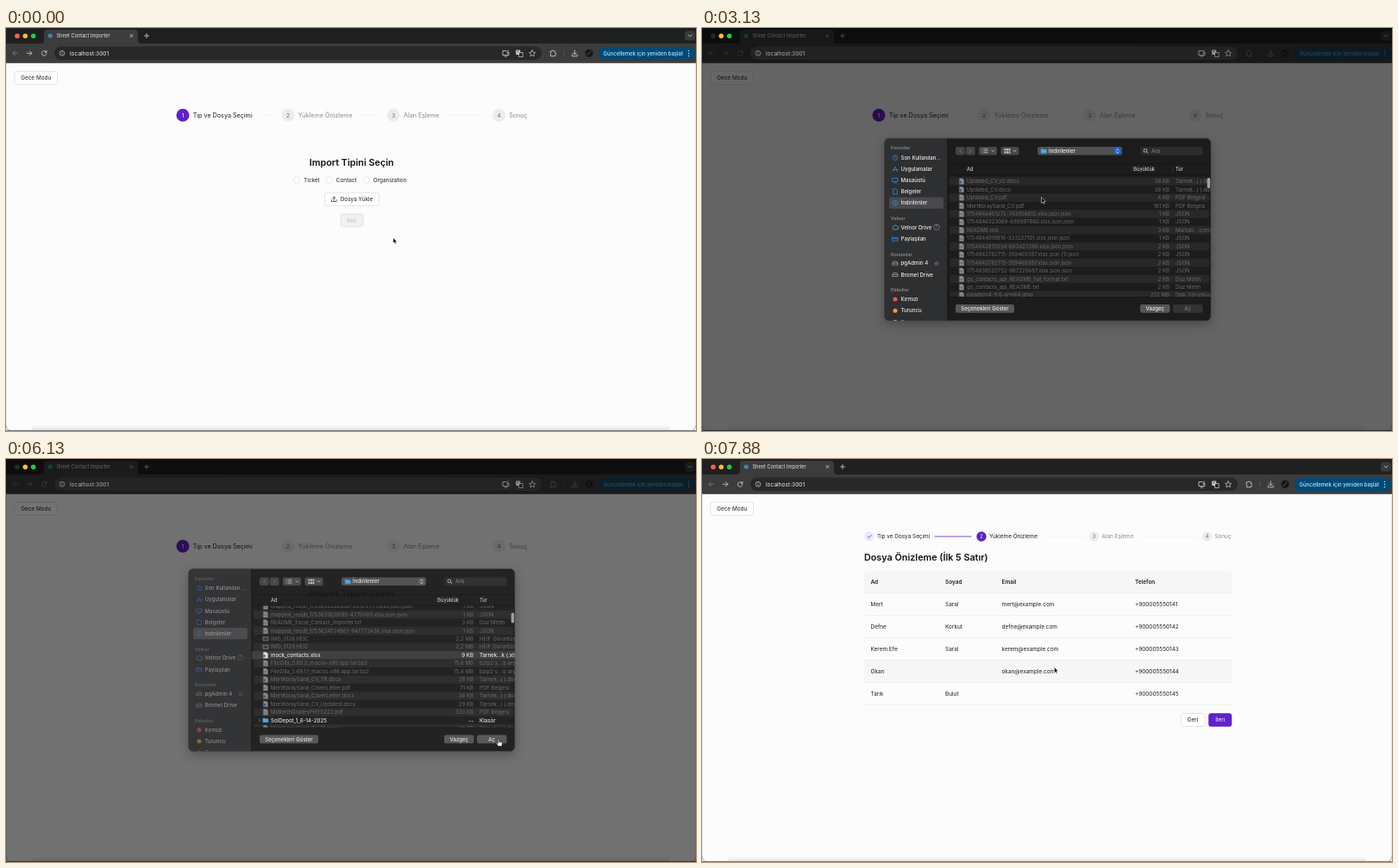
Recreate the animation shown at these times as an HTML page. Size 800 by 468 pixels, loop 8 s.

```html
<!DOCTYPE html>
<html lang="tr">
<head>
<meta charset="utf-8">
<title>Sheet Contact Importer</title>
<style>
html, body { margin: 0; width: 100%; height: 100%; overflow: hidden; background: #000; }
svg { display: block; width: 800px; height: 468px; font-family: Inter, Roboto, sans-serif; }
text { white-space: pre; }
</style>
</head>
<body>
<svg id="stage" viewBox="0 0 800 468"></svg>
<script>
const PURPLE = '#6022c6', HOVER = '#8549de', INK = '#202020', BLUE = '#2b8cf0';

// Drawing helpers; text is centred vertically on y.
const text = (x, y, s, size, fill, more = '') =>
  `<text x="${x}" y="${y + size * .36}" font-size="${size}" fill="${fill}" ${more}>${s}</text>`;
const rect = (x, y, w, h, r, fill, more = '') =>
  `<rect x="${x}" y="${y}" width="${w}" height="${h}" rx="${r}" fill="${fill}" ${more}/>`;
const circle = (x, y, r, fill, more = '') =>
  `<circle cx="${x}" cy="${y}" r="${r}" fill="${fill}" ${more}/>`;
const path = (d, stroke, w = .8, fill = 'none') =>
  `<path d="${d}" stroke="${stroke}" stroke-width="${w}" fill="${fill}" stroke-linecap="round" stroke-linejoin="round"/>`;
const group = (id, body) => `<g id="${id}">${body}</g>`;
const MID = ' text-anchor="middle"', END = ' text-anchor="end"', BOLD = ' font-weight="600"', MEDIUM = ' font-weight="500"';

const button = (x, y, w, h, label, fill, stroke, color) =>
  rect(x, y, w, h, 2.6, fill, `stroke="${stroke}" stroke-width=".6"`) +
  text(x + w / 2, y + h / 2, label, 6.45, color, MID);

// Browser window
const LIGHT = '#d5d5d5';
function browser() {
  return rect(0, 0, 800, 20, 0, '#1f2020') +
    rect(0, 18, 800, 22.5, 0, '#3c3c3c') +
    path('M40 18.5Q44 18 44 14V6Q44 2 48 2H149Q153 2 153 6V14Q153 18 157 18.5Z', 'none', 0, '#3c3c3c') +
    circle(51.3, 9, 2.6, '#3c88b0') +
    text(58.5, 9, 'Sheet Contact Importer', 5.65, '#e6e6e6') +
    path('M144 7.5l3 3m0-3l-3 3', LIGHT) +
    path('M160.5 9h5M163 6.5v5', LIGHT) +
    rect(787, 3.5, 12, 11, 3.5, '#393a3a') + path('M791 8l2 2 2-2', LIGHT) +
    path('M13.5 29.3H8m2.5-2.5L8 29.3l2.5 2.5', '#808080') +
    group('nav',
      path('M24.3 29.3H30m-2.5-2.5L30 29.3l-2.5 2.5', LIGHT) +
      path('M46.7 28A2.8 2.8 0 1 0 47 30M47 26.3V28.3H45', LIGHT)) +
    group('tools',
      path('M631.5 27H633a1 1 0 0 1 2 0h1.7v2a1 1 0 0 1 0 2v1.7h-5.2v-2a1 1 0 0 0 0-1.7Z', LIGHT) +
      path('M647 26.5v5', '#606060', .6) +
      path('M659.3 25.8v5m-2-2l2 2 2-2M656.3 30.8v2h6v-2', LIGHT) +
      circle(676, 29.3, 4.6, '#151515') + path('M673.5 31q3-1 4.5-4', '#5a564e', 1) +
      rect(687, 22, 112, 15, 7, '#004a77') +
      text(692.5, 29.5, 'Güncellemek için yeniden başlat', 6, '#c2e7ff', MEDIUM) +
      [26.5, 29.5, 32.5].map(y => circle(791.5, y, .75, '#c2e7ff')).join(''));
}

const omnibox = () => rect(56, 21.5, 565, 15.5, 7.7, '#282828') +
  circle(65, 29.3, 2.9, 'none', `stroke="${LIGHT}" stroke-width=".7"`) +
  path('M65 29v1.7M65 27.7v.1', LIGHT, .7) +
  text(74, 29.5, 'localhost:3001', 6.6, '#ececec') +
  path('M580 26.5H576v5h7v-1.5M578 33h3M582 26v3.5m-1.5-1.3l1.5 1.5 1.5-1.5', LIGHT) +
  rect(591.2, 25.5, 5, 5.5, .8, LIGHT) + path('M595 28.5h4.2v5H595Z', LIGHT, .7, '#282828') +
  path('M592.5 27h2.4M593.7 26.5q0 2-1.2 3', '#333', .5) +
  path('M610.2 25.8l1.1 2.3 2.5.3-1.8 1.8.5 2.5-2.3-1.2-2.3 1.2.5-2.5-1.8-1.8 2.5-.3Z', LIGHT, .7);

// Progress steps
const STEPS = ['Tip ve Dosya Seçimi', 'Yükleme Önizleme', 'Alan Eşleme', 'Sonuç'];
function steps(xs, y, r, size, active, lines) {
  const dot = (x, i) => {
    const on = i === active, done = i < active;
    return circle(x, y, r, on ? PURPLE : done ? '#f0e7fb' : '#ececec') +
      (done ? path(`M${x - 2} ${y}l1.5 1.5 2.7-3`, PURPLE)
            : text(x, y, i + 1, size * .9, on ? '#fff' : '#666', MID)) +
      text(x + r * 1.56, y, STEPS[i], size, i <= active ? INK : '#8a8a8a');
  };
  return xs.map(dot).join('') + lines.map(([a, b], i) =>
    path(`M${a} ${y}H${b}`, i < active ? PURPLE : '#ececec', i < active ? .8 : .6)).join('');
}

// First page
const radio = (x, label) => circle(x, 176.5, 3.7, '#fff', 'stroke="#d9d9d9" stroke-width=".6"') +
  text(x + 7.8, 176.7, label, 6.45, INK);
const upload = (color, line) => rect(369.5, 191.3, 63, 15, 2.6, '#fff', `stroke="${line}" stroke-width=".6"`) +
  path('M380.3 200.3v-4m-1.7 1.5l1.7-1.7 1.7 1.7M377.5 199.5v2h5.6v-2', color, .7) +
  text(387.7, 199, 'Dosya Yükle', 6.45, color);

const firstPage = () =>
  steps([205, 327, 449.3, 571.5], 101.3, 7.5, 7.2, 0, [[293, 312], [411, 433], [511, 556]]) +
  text(400.7, 155.8, 'Import Tipini Seçin', 10.8, '#111', MID + BOLD) +
  radio(337.2, 'Ticket') + radio(375, 'Contact') + radio(418, 'Organization') +
  group('picked', circle(337.2, 176.5, 4, PURPLE) + circle(337.2, 176.5, 1.6, '#fff')) +
  upload(INK, '#d0d0d0') + group('hover', upload(HOVER, HOVER)) +
  group('waiting', button(388, 216, 26, 14.7, 'İleri', '#f1f1f1', '#d6d6d6', '#bdbdbd')) +
  group('ready',
    path('M373 218.5l2.6-2.7a1.2 1.2 0 0 0-1.7-1.7l-2.9 3a2 2 0 0 0 2.9 2.8l2.4-2.5', '#888', .6) +
    text(379, 217, 'mock_contacts.xlsx', 6.45, INK) +
    button(388, 230, 26, 14.7, 'İleri', PURPLE, PURPLE, '#fff'));

// Second page
const PEOPLE = [
  ['Ad', 'Soyad', 'Email', 'Telefon'],
  ['Mert', 'Saral', 'mert@example.com', '+900005550141'],
  ['Defne', 'Korkut', 'defne@example.com', '+900005550142'],
  ['Kerem Efe', 'Saral', 'kerem@example.com', '+900005550143'],
  ['Okan', '', 'okan@example.com', '+900005550144'],
  ['Tarık', 'Bulut', '', '+900005550145']];
const secondPage = () =>
  steps([194, 324, 454.6, 585.5], 90, 5.7, 6.4, 1, [[270, 312], [396, 444], [507, 574]]) +
  text(188, 114, 'Dosya Önizleme (İlk 5 Satır)', 10.8, '#111', BOLD) +
  rect(188, 130, 426, 25.5, 3, '#f6f6f6') +
  group('rowHover', rect(188, 233.5, 426, 26, 0, '#f6f6f6')) +
  [274, 339, 494].map(x => path(`M${x} 138v10`, '#ebebeb', .5)).join('') +
  PEOPLE.map((row, i) => path(`M188 ${155.5 + i * 26}h426`, '#ebebeb', .6) +
    row.map((s, j) => text([195.5, 282, 347.5, 502][j], 142.7 + i * 26, s, 6.45, INK, i ? '' : BOLD)).join('')).join('') +
  button(555.3, 295.5, 27.5, 15, 'Geri', '#fff', '#d0d0d0', INK) +
  button(587.5, 295.5, 26.5, 15, 'İleri', PURPLE, PURPLE, '#fff');

// File dialog
const ROW = 9.45, FILLERS = 20, SCROLL = ROW * (FILLERS + 16) - 3;
const random = seed => { const v = Math.sin(seed * 12.9898) * 43758.5453; return v - Math.floor(v); };
const filler = Array.from({length: FILLERS}, (_, i) =>
  `mapped_result_${1753838520752 - i * 10894021}-${Math.floor(random(i + 1) * 9e8 + 1e8)}.xlsx.json.json|1 KB|JSON`);
const DOC = 'Tarnek…j (.docx)';
const FILES = [
  'Updated_CV_v2.docx|38 KB|' + DOC, 'Updated_CV.docx|38 KB|' + DOC,
  'Updated_CV.pdf|4 KB|PDF Belgesi', 'MertKoraySaral_CV.pdf|181 KB|PDF Belgesi',
  '1754846451272-743956612.xlsx.json.json|1 KB|JSON', '1754846323069-689997660.xlsx.json.json|1 KB|JSON',
  'README.md|3 KB|Markdo…içeriği', '1754844919816-333227101.xlsx.json.json|1 KB|JSON',
  '1754842815034-693427266.xlsx.json.json|2 KB|JSON', '1754842782715-359469387.xlsx.json (1).json|2 KB|JSON',
  '1754842782715-359469387.xlsx.json.json|2 KB|JSON', '1754838520752-987225687.xlsx.json.json|2 KB|JSON',
  'go_contacts_api_README_full_format.txt|2 KB|Düz Metin', 'go_contacts_api_README.txt|2 KB|Düz Metin',
  'pgadmin4-9.6-arm64.dmg|222 MB|Disk Görüntüsü', ...filler,
  'mapped_result_1753632030230-531217771.xlsx.json.json|1 KB|JSON',
  'mapped_result_1753631839195-4770069.xlsx.json.json|1 KB|JSON',
  'README_Excel_Contact_Importer.txt|3 KB|Düz Metin',
  'mapped_result_1753624724861-947772436.xlsx.json.json|1 KB|JSON',
  'IMG_3128.HEIC|2,2 MB|HEIF Görüntüsü', 'IMG_3129.HEIC|2,2 MB|HEIF Görüntüsü',
  'mock_contacts.xlsx|9 KB|Tarnek…k (.xlsx)',
  'FileZilla_3.69.2_macos-x86.app.tar.bz2|15,6 MB|bzip2 s…ış arşivi',
  'FileZilla_3.69.1.1_macos-x86.app.tar.bz2|15,4 MB|bzip2 s…ış arşivi',
  'MertKoraySaral_CV_TR.docx|38 KB|' + DOC, 'MertKoraySaral_CoverLetter.pdf|71 KB|PDF Belgesi',
  'MertKoraySaral_CoverLetter.docx|38 KB|' + DOC, 'MertKoraySaral_CV_Updated.docx|29 KB|' + DOC,
  'MidtermGradesPHYS222.pdf|333 KB|PDF Belgesi', 'SolDepot_1_6-14-2025|--|Klasör',
  'MertKoraySaral_CV_19.docx|38 KB|' + DOC].map(s => s.split('|'));
const MOCK = FILES.findIndex(f => f[0].startsWith('mock'));

const folder = (x, y) => path(`M${x - 3} ${y - 2.3}h2l.8.8h3.2v4h-6Z`, '#45b0ee', .4, '#45b0ee');
function fileRow([name, size, type], i) {
  const y = 178 + i * ROW, dir = type === 'Klasör', on = dir || i === MOCK;
  const color = on ? '#f2f2f2' : '#6b6b6b', weight = on ? MEDIUM : '';
  const paper = on ? '#eee' : '#8b8b8b';
  const icon = dir ? folder(301, y) + path(`M293.3 ${y - 1.5}l1.5 1.5-1.5 1.5`, '#aaa', .6)
    : name.endsWith('HEIC') ? rect(297.5, y - 2.5, 7, 5, .5, '#777') + rect(298.5, y - 1.5, 5, 3, 0, '#333')
    : path(`M298.5 ${y - 3.3}h3.3l1.7 1.7v5h-5Z`, paper, .3, paper) +
      (/(docx|xlsx)$/.test(name) ? rect(298, y - .5, 3, 3, .3, on ? '#2c9a55' : '#3b5d96')
        : path(`M299.8 ${y}h2.4m-2.4 1.3h2.4`, '#555', .5));
  return icon + text(307, y, name, 6.1, color, weight) +
    text(542, y, size, 6.1, color, weight + END) + text(549, y, type, 6.1, color, weight);
}

// Small sidebar symbols, drawn around the origin.
const ring = circle(0, 0, 2.9, 'none', `stroke="${BLUE}" stroke-width=".7"`);
const ICONS = {
  clock: ring + path('M0-1.7V0H1.3', BLUE, .7),
  apps: path('M-2.5 2.5L0-2.5 2.5 2.5M-3 1h6', BLUE),
  desk: path('M-3-2.5h6v4h-6ZM-1 3h2', BLUE),
  page: path('M-2-3H.8L2.3-1.5V3H-2Z', BLUE),
  down: ring + path('M0-1.5v3m-1.2-1.2l1.2 1.2 1.2-1.2', BLUE, .7),
  cloud: path('M-2 2.2a1.6 1.6 0 0 1-.2-3 2.3 2.3 0 0 1 4.3-.4 1.7 1.7 0 0 1 .3 3.4Z', '#57b9cf'),
  folder: path('M-3-2h2l.7.7h3.3v3.7h-6ZM-3-.2h6', BLUE),
  drive: path('M-3 0l1-2h4l1 2v2h-6ZM-3 0h6', '#aaa', .7),
  red: circle(0, 0, 2.5, '#f2554d'), orange: circle(0, 0, 2.5, '#f09a37'), yellow: circle(0, 0, 2.5, '#f3cd45')
};
const HEADS = {139.5: 'Favoriler', 221.5: 'Velnor', 263: 'Konumlar', 304.5: 'Etiketler'};
const PLACES = [
  [150.5, 'clock', 'Son Kullanılan…'], [163.7, 'apps', 'Uygulamalar'], [176.9, 'desk', 'Masaüstü'],
  [190, 'page', 'Belgeler'], [203.2, 'down', 'İndirilenler'], [231.6, 'cloud', 'Velnor Drive'],
  [244.9, 'folder', 'Paylaşılan'], [273.2, 'drive', 'pgAdmin 4'], [286.5, 'drive', 'Bromel Drive'],
  [315, 'red', 'Kırmızı'], [328.3, 'orange', 'Turuncu'], [341.5, 'yellow', 'Sarı']];

const pill = (x, y, w, h, label, fill, id = '') =>
  rect(x, y, w, h, 2, fill, id && `id="${id}"`) +
  text(x + w / 2, y + h / 2, label, 6.1, '#f0f0f0', MID + MEDIUM + (id && ` id="${id}Label"`));

function dialog() {
  const side = rect(217, 196.6, 63, 13.2, 2.6, '#48494b') +
    group('places', Object.entries(HEADS).map(([y, s]) => text(219, +y, s, 5.3, '#8c8c8c', BOLD)).join('') +
      PLACES.map(([y, icon, s]) => `<g transform="translate(224 ${y})">${ICONS[icon]}</g>` +
        text(230.5, y, s, 6.1, '#ececec', MEDIUM)).join('') +
      circle(272, 231.3, 3.3, 'none', 'stroke="#999" stroke-width=".6"') + path('M272 228v3.3', '#999', .6) +
      path('M270 273.5l2-2.5 2 2.5ZM270 275h4', '#999', .5));
  const bar = rect(294, 138, 10.8, 9.5, 2, '#444') + rect(305.8, 138, 10.8, 9.5, 2, '#444') +
    path('M300.3 141l-1.6 1.7 1.6 1.7M310.5 141l1.6 1.7-1.6 1.7', '#888', .7) +
    rect(321, 138, 21, 9.5, 2, '#484848') + rect(346.5, 138, 21, 9.5, 2, '#484848') +
    path('M325 140.7h.1m1.9 0h4M325 142.7h.1m1.9 0h4M325 144.7h.1m1.9 0h4M336 142l1.5 1.5 1.5-1.5M361 142l1.5 1.5 1.5-1.5', '#ddd', .7) +
    [0, 2.5, 5].map(d => rect(350.5 + d, 140, 1.9, 2.3, .3, '#ccc') + rect(350.5 + d, 143.2, 1.9, 2.3, .3, '#ccc')).join('') +
    rect(389, 138, 98, 9.5, 2, '#505050') + folder(396.3, 142.8) +
    text(402, 142.8, 'İndirilenler', 6.1, '#f0f0f0', MEDIUM) +
    rect(478, 138.8, 7.5, 8, 1.8, '#1762dc', 'id="stepper"') +
    path('M480.5 142l1.3-1.5 1.3 1.5M480.5 143.8l1.3 1.5 1.3-1.5', '#fff', .7) +
    rect(508.5, 138, 72, 9.5, 2, '#2c2c2c') + circle(514, 142.3, 1.9, 'none', 'stroke="#ddd" stroke-width=".7"') +
    path('M515.5 143.8l1.5 1.5', '#ddd', .7) + text(521, 142.8, 'Ara', 6.1, '#888');
  const list = FILES.map((_, i) => i % 2 ? '' : rect(287, 173.3 + i * ROW, 301, ROW, 1.5, '#282828')).join('') +
    rect(285, 173.3 + MOCK * ROW, 305, ROW, 0, '#0b57d0', 'id="selected"') + FILES.map(fileRow).join('');
  return rect(211.5, 128, 378.5, 212, 5.5, '#1e1e1e', 'filter="url(#shadow)"') +
    '<g clip-path="url(#frame)">' + rect(211, 128, 73.5, 212, 0, '#2e2f31') + side +
    path('M284.7 128v212', '#111', .6) + bar + path('M285 158h305M285 170.5h305M285 312h305', '#101010', .6) +
    text(307, 164.3, 'Ad', 5.6, '#ccc', MEDIUM) + text(525, 164.3, 'Büyüklük', 5.6, '#ccc', END + MEDIUM) +
    text(549, 164.3, 'Tür', 5.6, '#ccc', MEDIUM) + path('M499 161.5v6M545.5 161.5v6', '#383838', .5) +
    `<g clip-path="url(#rows)">${group('list', list)}</g>` +
    rect(585.7, 174, 3.6, 12, 1.8, '#a4a4a4', 'id="thumb"') +
    pill(294, 321, 68, 9.7, 'Seçenekleri Göster', '#565656') + pill(508, 321, 34.5, 9.7, 'Vazgeç', '#565656') +
    pill(546, 321, 34.5, 9.7, 'Aç', '#333', 'open') + '</g>' +
    rect(211.5, 128, 378.5, 212, 5.5, 'none', 'stroke="#444" stroke-width=".6"');
}

const stage = document.getElementById('stage');
stage.innerHTML = `<defs>
  <filter id="shadow" x="-20%" y="-20%" width="140%" height="150%"><feDropShadow dx="0" dy="4" stdDeviation="7" flood-opacity=".3"/></filter>
  <clipPath id="frame">${rect(211.5, 128, 378.5, 212, 5.5, '#000')}</clipPath>
  <clipPath id="rows">${rect(285, 171, 305, 141, 0, '#000')}</clipPath>
  <linearGradient id="edge" x2="0" y2="1"><stop stop-color="#fcfcfc"/><stop offset="1" stop-color="#e6e6e6"/></linearGradient></defs>` +
  browser() + rect(0, 40.5, 800, 427, 0, '#fcfcfc') + rect(30, 461, 740, 6, 3, 'url(#edge)') +
  path('M0 40.5H800', '#4a4a4a', .6) + path('M.3 41V462M799.7 41V462', '#ccc', .6) +
  path('M.3 462Q.3 467.4 6 467.4H794Q799.7 467.4 799.7 462', '#777', .6) +
  button(10, 50.3, 49.5, 15, 'Gece Modu', '#fff', '#d0d0d0', INK) +
  group('first', firstPage()) + group('second', secondPage()) +
  rect(0, 0, 800, 468, 0, '#000', 'id="shade"') + group('omni', omnibox()) +
  circle(13, 9.2, 2.8, '#ff5f57', 'id="close"') + circle(22.3, 9.2, 2.8, '#febc2e') + circle(31.7, 9.2, 2.8, '#28c840') +
  group('dialog', dialog()) +
  group('cursor',
    group('arrow', path('M0 0V6.2L1.5 4.9 2.5 7.2 3.5 6.8 2.5 4.6H4.4Z', '#fff', .5, '#000')) +
    group('hand', path('M-.7 4.5V.4a.7.7 0 0 1 1.4 0V3L3.8 3.6Q4.6 4 4.4 5L3.9 8H-.2L-2.4 4.9Q-1.8 3.800-.7 4.5Z', '#000', .5, '#fff')));

const part = Object.fromEntries([...stage.querySelectorAll('[id]')].map(el => [el.id, el]));
const set = (id, name, value) => part[id].setAttribute(name, value);
const show = (id, on) => set(id, 'display', on ? 'inline' : 'none');
const clamp = v => Math.max(0, Math.min(1, v));
const ease = v => { v = clamp(v); return v * v * (3 - 2 * v); };

// Pointer stops: time, x, y
const STOPS = [[0, 449, 243.8], [150, 449, 243.8], [880, 337, 176], [1200, 337, 176], [1750, 393.5, 197],
  [4300, 393.5, 197], [4750, 389, 229], [5000, 389, 229], [5130, 390, 236.5], [5750, 571, 325.5],
  [6200, 571, 325.5], [6380, 569.3, 325.8], [6950, 408.5, 242], [8000, 408.5, 242]];
function pointer(t) {
  const i = STOPS.findIndex(s => s[0] > t), [t0, x0, y0] = STOPS[i - 1], [t1, x1, y1] = STOPS[i];
  const k = ease((t - t0) / (t1 - t0));
  return [x0 + (x1 - x0) * k, y0 + (y1 - y0) * k];
}

function draw(now) {
  const t = now % 8000;
  const modal = t >= 2380 && t < 6250, chosen = t >= 4870, closing = t >= 6000, preview = t >= 7370;
  const inactive = t >= 2380 && t < 6500;
  const scroll = ease((t - 3350) / 1050), fade = clamp(1 - (t - 6120) / 130);
  const [x, y] = pointer(t), pointing = modal && x > 546 && y > 321;

  show('first', !preview);
  show('second', preview);
  show('rowHover', t >= 7480);
  show('picked', t >= 1120);
  show('hover', t >= 1620 && t < 6250);
  show('waiting', t < 6620);
  show('ready', t >= 6620);

  show('shade', modal);
  set('shade', 'opacity', .6 * fade);
  set('omni', 'opacity', modal ? .7 : 1);
  set('close', 'fill', modal ? '#282828' : '#ff5f57');
  set('nav', 'opacity', inactive ? .45 : 1);
  set('tools', 'opacity', inactive ? .6 : 1);

  show('dialog', modal);
  set('dialog', 'opacity', Math.min(clamp((t - 2370) / 200), fade));
  set('dialog', 'transform', `translate(0 ${closing ? -.5 : 0})`);
  set('list', 'transform', `translate(0 ${-SCROLL * scroll})`);
  set('thumb', 'y', 174 + 5 * scroll);
  show('selected', chosen);
  set('selected', 'fill', closing ? '#3c3c3c' : '#0b57d0');
  set('stepper', 'fill', closing ? '#5c5c5c' : '#1762dc');
  set('places', 'opacity', closing ? .5 : 1);
  set('open', 'fill', closing ? '#565656' : chosen ? '#0b57d0' : '#333');
  set('openLabel', 'fill', chosen ? '#f0f0f0' : '#777');

  show('arrow', !pointing);
  show('hand', pointing);
  set('cursor', 'transform', `translate(${x} ${y})`);
  requestAnimationFrame(draw);
}
requestAnimationFrame(draw);
</script>
</body>
</html>
```
